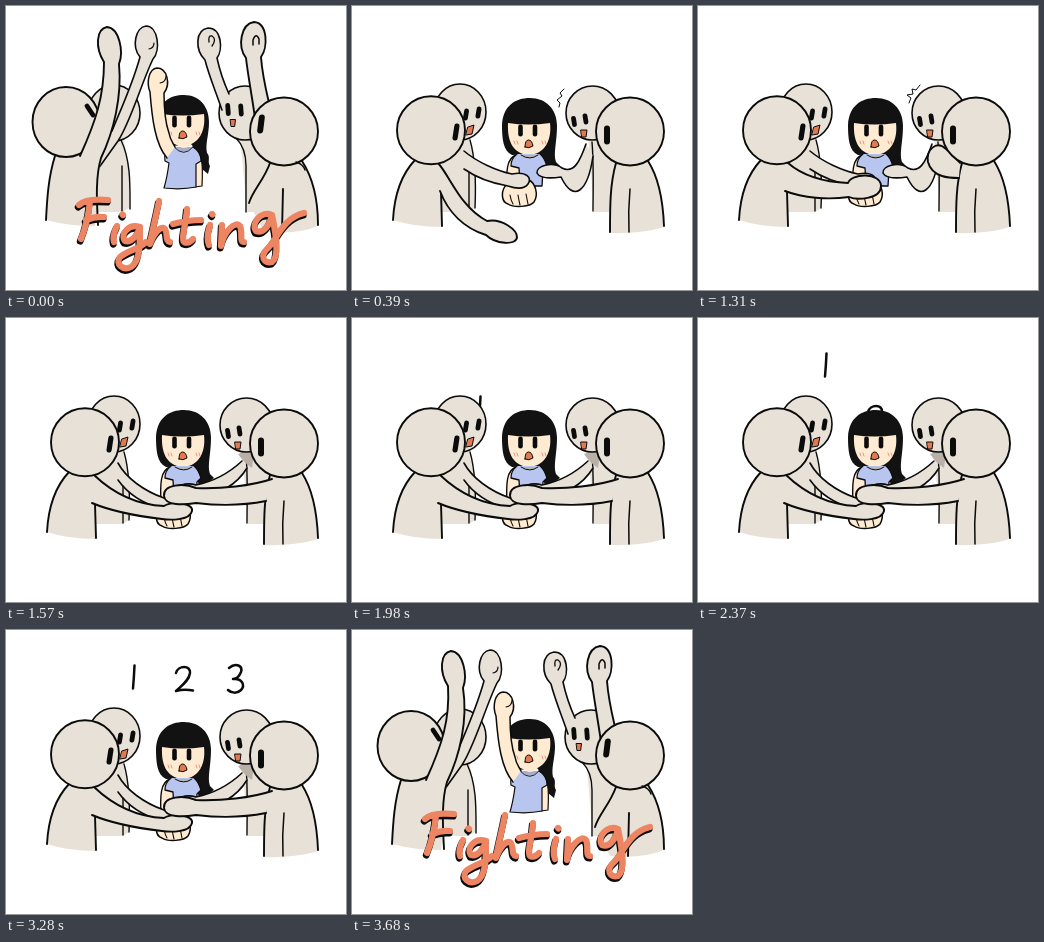
Animation of 340 by 284 pixels, one loop 3.81 s. Source, as an HTML page:

```html
<!DOCTYPE html>
<html lang="en">
<head>
<meta charset="utf-8">
<title>One, two, three, Fighting</title>
<style>
  html, body { margin: 0; width: 100%; height: 100%; overflow: hidden; background: #fff; }
  svg { display: block; width: 100%; height: 100%; }
</style>
</head>
<body>
<svg id="stage" viewBox="0 0 340 284" stroke-linecap="round" stroke-linejoin="round"></svg>
<script>
const LOOP = 3810;
const INK = '#0b0b0b', HAIR = '#121212', CLAY = '#e7e1d7', SKIN = '#ffebd2', BLUE = '#b8c5ee';
const ORANGE = '#ee8562', MOUTH = '#e2794f';
const stage = document.getElementById('stage');

const shape = (d, fill = CLAY, width = 1.9) =>
  `<path d="${d}" fill="${fill}" stroke="${INK}" stroke-width="${width}"/>`;
const flat = (d, fill = CLAY) => `<path d="${d}" fill="${fill}"/>`;
const line = (d, width = 1.9, color = INK) =>
  `<path d="${d}" fill="none" stroke="${color}" stroke-width="${width}"/>`;
const oval = (x, y, rx, ry, fill = CLAY, width = 1.9) =>
  `<ellipse cx="${x}" cy="${y}" rx="${rx}" ry="${ry}" fill="${fill}" stroke="${INK}" stroke-width="${width}"/>`;
const eye = (x, y, height, lean = 0, width = 4.8) => {
  const half = (height - width) / 2;
  return line(`M${x + lean} ${y - half}L${x - lean} ${y + half}`, width);
};
const group = (x, y, body) => `<g transform="translate(${x} ${y})">${body}</g>`;
const mouth = (x, y, w, h) =>
  shape(`M${x - w / 2} ${y - h / 2}L${x + w / 2} ${y - h / 2}L${x + w / 3} ${y + h / 2}L${x - w / 3} ${y + h / 2}Z`, MOUTH, 1);

// Key outlines of each reaching arm; a fractional pose blends two neighbours.
const ARMS = {
  backLeft: [
    'M112 145C116 150 118 154 122 157C130 155 134 162 132 168C129 173 124 173 120 171C117 169 114 167 112 164',
    'M112 145C125 156 145 165 160 168C175 165 180 172 176 178C172 184 162 182 156 180C138 177 125 172 112 163',
    'M112 145C120 160 138 173 158 180C170 178 178 182 176 188C172 194 162 193 156 191C138 186 122 176 112 162',
    'M112 145C125 156 145 165 160 168C175 165 180 172 176 178C172 184 162 182 156 180C138 177 125 172 112 163'],
  frontLeft: [
    'M86 157C98 170 108 201 135 215C150 212 165 224 165 231C165 240 143 238 134 229C112 222 96 206 88 185',
    'M90 157C105 170 125 176 150 177C153 167 183 166 183 180C183 194 158 194 151 191C130 194 105 192 87 185',
    'M88 157C110 178 135 187 158 188C166 183 188 185 186 193C184 203 163 202 156 201C130 198 105 193 86 185',
    'M88 157C110 174 135 179 152 179C158 175 183 173 183 181C183 193 162 193 153 191C130 194 105 193 87 185'],
  backRight: [
    'M234 138C228 155 222 168 210 162C200 155 184 160 185 167C188 173 202 172 209 171C222 198 236 185 241 150',
    'M236 143C222 156 205 164 190 167C180 164 168 168 170 174C172 181 180 180 190 180C212 177 230 168 241 150',
    'M236 143C222 155 205 160 190 160C180 158 168 161 170 168C172 175 180 174 190 174C212 173 230 166 241 150'],
  frontRight: [
    'M262 157C256 150 252 146 248 143C238 134 228 144 230 156C232 164 238 168 244 170C250 172 256 172 261 172',
    'M266 161C245 168 215 171 190 170C178 165 157 166 158 178C159 188 178 187 190 185C215 188 240 187 260 183',
    'M266 161C245 169 215 172 190 163C178 158 158 160 159 172C160 182 178 181 190 179C215 186 240 184 261 181']
};

function arm(name, pose, width) {
  if (pose < 0) return '';
  const keys = ARMS[name];
  const from = Math.min(Math.floor(pose), keys.length - 2);
  const target = keys[from + 1].match(/\d+/g);
  let i = 0;
  const d = keys[from].replace(/\d+/g, v => (+v + (target[i++] - v) * (pose - from)).toFixed(1));
  return shape(d, CLAY, width);
}

const SEATED_HAIR = 'M160 149C151 145 150 132 150 119C151 100 163 92 178 92C194 92 205 103 205 120C205 136 201 148 204 156L208 160L204 163L205 168C200 170 199 173 194 172L188 148Z';
const LONG_HAIR = 'M160 149C153 143 152 132 152 121C153 105 164 98 178 98C193 98 203 109 203 125C203 138 199 147 201 156C205 160 201 165 204 169L202 177L196 172L191 158L186 148Z';

const girlHead = hair =>
  flat(hair, HAIR) +
  flat('M156 117Q176 120 198 117C200 134 193 148 177 149C163 148 155 138 156 117Z', SKIN) +
  eye(168.5, 124.5, 12, 0, 4.6) + eye(183, 124.5, 12, 0, 4.6) +
  shape('M173 141Q173 134 176.5 134Q180 134 181 140Q177 143 173 141Z', MOUTH, 1) +
  line('M162 135l1 3m2-3l1 3M190 135l1 3m2-3l1 3', 1, '#f0937f');

const seatedGirl = () =>
  girlHead(SEATED_HAIR) +
  shape('M165 149C154 151 154 166 155 190L167 190L168 160', SKIN, 1.4) +
  shape('M165 148C161 151 159 156 159 160L167 162L168 180L190 180L191 164L195 160C193 154 191 150 188 148', BLUE, 1.3) +
  shape('M169 149Q178 155 186 149', '#b9b9a5', 1);

const fist = () =>
  shape('M156 177C148 184 149 196 156 198C162 202 178 201 182 196C187 188 183 177 177 174C169 170 160 172 156 177Z', SKIN, 1.5) +
  line('M158 189Q159 195 161 198M166 189Q167 195 168 199M174 188Q175 193 176 198', 1.1);

const JAGS = ['M212 83L208 87L210 90L205 94L208 97L207 101', 'M211 97L213 92L209 89L215 88L214 83L218 84L222 79'];

function gathered(s) {
  const fistDrop = Math.max(0, 10 * (1 - Math.abs(s.frontLeft - 2)));
  const backLeft = flat('M89 130L117 134C124 160 124 185 123 202L117 206L89 206Z') +
    line('M118 134C124 155 124 180 123 202M117 165V205', 1.4) +
    oval(108, 106, 26, 28, CLAY, 1.6) + eye(114, 108.5, 12, .6) + eye(126.5, 106.5, 12, .6) +
    shape('M116 121L122 119L120 128L114 129Z', MOUTH, 1);
  const backRight = flat('M236 130H270V206H242Z') + line('M240 136C242 160 241 185 241 205', 1.4) +
    (s.backRight > .9 ? flat('M232 136Q240 132 248 136L246 150Q238 145 232 136Z', '#b9b1a7') : '');
  const backRightHead = oval(240.5, 107, 26.5, 27, CLAY, 1.6) +
    eye(222, 115.5, 11, -.5) + eye(233.5, 113, 11, -.5) + mouth(232, 127.5, 6, 7);
  const frontLeft = flat('M63 153C45 172 42 195 41 214Q62 221 90 221L89 150Z') +
    line('M63 154C46 172 42 195 41 214M89 186L90 220');
  const frontRight = flat('M264 153C258 175 258 200 258 227Q290 228 312 221C311 190 304 165 295 153Z') +
    line('M264 157C258 178 258 200 258 226M296 155C307 172 311 195 312 220');
  return backLeft + seatedGirl() + group(0, fistDrop, fist()) +
    backRight + arm('backRight', s.backRight, 1.6) + backRightHead +
    arm('backLeft', s.backLeft, 1.6) +
    frontLeft + arm('frontLeft', s.frontLeft) + oval(79, 124.3, 34, 34) + eye(104, 126, 17, .9, 5.2) +
    frontRight + arm('frontRight', s.frontRight) + line('M278 183Q276 205 277 226', 1.5) +
    oval(278, 125.5, 34, 34) + eye(255, 129, 19, 0, 6) +
    (s.jag >= 0 ? line(JAGS[s.jag], 1) : '');
}

// Hand lettering, drawn as pen strokes.
const LETTERS = [
  'M84 195Q82 216 75 233M73 199Q80 192 102 194M80 214Q90 210 98 211',
  'M111 220Q106 230 108 236M116.5 208.5l.5 .5',
  'M134 221C122 217 114 229 119 235C126 237 132 228 134 221C134 238 134 256 125 261C117 265 109 258 114 251C122 244 134 243 140 236',
  'M153 195C150 211 146 225 144 238C148 227 155 219 159 223C162 228 159 235 164 236',
  'M181 203C180 218 175 232 178 236Q183 238 187 233M167 218Q182 214 195 214',
  'M204 219Q200 232 203 239M206 208l.5 .5',
  'M216 219L215 240C218 226 229 214 234 220C237 226 233 236 238 236',
  'M266 209C254 204 245 218 250 225C258 228 264 218 266 209C270 228 274 250 266 256C258 258 253 250 262 242C272 232 277 212 298 207'
].join('');

const lettering = y =>
  group(0, y, group(-.8, 2.2, line(LETTERS, 6.8)) + line(LETTERS, 6.2, ORANGE));

// lean pulls the left-hand figures outward, textY raises the lettering
function cheering(lean, textY) {
  const backLeft = flat('M88 130L117 133C124 155 124 185 123 202L116 206H88Z') +
    line('M115 134C125 155 124 180 124 203M116 160V205', 1.4) + oval(108, 107, 26, 28, CLAY, 1.6) +
    group(-lean, 0,
      shape('M106 125C114 105 126 80 134 51C125 40 130 21 140 20C152 20 155 44 147 53C135 78 125 115 112 135L92 163', CLAY, 1.6) +
      line('M143 43Q148 42 148 37', 1.2));
  const frontLeft = flat('M48 148C42 175 41 195 40 214Q62 220 89 220L95 150Z') +
    line('M49 150C42 172 41 195 40 214') + oval(60 - lean / 2, 116, 33.5, 35) +
    line('M81 100L87 109', 4.8) +
    shape(`M74 150C90 115 98 90 ${98 - lean} 56C${89 - lean} 42 ${90 - lean} 23 ${101 - lean} 21C${113 - lean} 22 ${118 - lean} 45 ${113 - lean} 58C116 90 108 125 95 152C89 172 91 198 92 219`);
  const girl = group(0, -9, girlHead(LONG_HAIR)) +
    shape('M188 143C197 148 197 160 196 180L189 181', SKIN, 1.2) +
    shape('M165 141C159 145 158 151 159 155L163 157Q161 172 158 182Q176 184 190 181L190 158L195 155C195 149 192 144 187 141', BLUE, 1.2) +
    shape('M168 141Q178 152 187 141', '#a9aec6', .8) + flat('M170 138Q178 146 186 138Z', SKIN) +
    shape('M161 152C149 138 146 112 144 86C140 76 143 63 151 62C161 62 165 78 158 87C158 100 159 116 163 127C164 134 167 137 169 141', SKIN, 1.5) +
    line('M154 77Q160 76 160 70', 1.1);
  const backRight = flat('M234 128H270V206H241Z') + line('M230 132Q240 142 240 160V206', 1.4) +
    oval(239, 107, 26, 27, CLAY, 1.6) +
    shape('M216 104C210 86 203 70 199 54C189 44 189 24 202 22C216 22 217 44 211 52C214 66 218 77 223 88', CLAY, 1.6) +
    line('M203 36Q202 29 206 30Q211 33 206 40', 1.3) +
    eye(222, 103.5, 13, -.3) + eye(235, 104, 13, -.3) + mouth(227, 117, 5, 7);
  const frontRight = flat('M264 153C257 175 246 185 243 197L258 226Q290 229 312 220C312 190 304 165 294 153Z') +
    line('M264 157C258 174 247 184 243 197M296 155C307 172 312 195 312 219M277 183L276 226') +
    shape('M249 112C246 90 242 70 240 52C231 40 235 18 248 16C262 17 262 42 255 51C256 66 259 80 263 97') +
    line('M247 39V34Q250 26 253 33V38', 1.5) +
    oval(278, 125.5, 34, 34) + eye(255, 118, 19, .8, 6) + line('M290 156Q297 158 299 164', 1.4);
  return backLeft + frontLeft + girl + backRight + frontRight + lettering(textY);
}

const COUNT_START = 1980, STEP = 130, BEAT = 3;
const LIFT = [0, 1, .5];
const DIGITS = [
  ['M128.5 35.5Q128 47 127 58.5', 43],
  ['M170 43C172 35 185 35 184 43C183 51 175 56 170 61Q178 59 187 60.5', 51],
  ['M223 38C230 32 237 36 235 42C233 47 230 49 227 49C237 48 239 56 235 60C231 64 225 63 222 60', 47]
];

const digits = ticks => DIGITS.map(([d, depth], n) => {
  const age = ticks - n * BEAT;
  return age < 0 ? '' : group(0, [depth, -13, -6][age] || 0, line(d, 2.5));
}).join('');

// start, back left, front left, back right, front right, startle mark
const GATHERING = [
  [130, 0, -1, -1, -1, -1],
  [260, .6, -1, 0, -1, -1],
  [390, 1, 0, 0, -1, 0],
  [520, 1, 0, 0, -1, 1],
  [650, 1, 0, 0, -1, 0],
  [780, 1, 0, 0, -1, 1],
  [1050, 1, .1, 0, -1, 0],
  [1180, 1, .6, 0, -1, 0],
  [1310, 1, 1, 0, 0, 1],
  [1440, 1.5, 1.5, .5, .6, -1],
  [1570, 2, 2, 1, 1, -1]
];

function scene(t) {
  if (t >= 3680) return cheering(2, -10);
  if (t < 130 || t >= 3550) return cheering(0, 0);
  const ticks = Math.min(Math.floor((t - COUNT_START) / STEP), 9);
  const lift = ticks < 0 ? 0 : LIFT[ticks % BEAT];
  const [, backLeft, frontLeft, backRight, frontRight, jag] = GATHERING.filter(row => row[0] <= t).pop();
  return digits(ticks) + gathered({
    backLeft: backLeft + lift, frontLeft: frontLeft + lift,
    backRight: backRight + lift, frontRight: frontRight + lift, jag
  });
}

const start = performance.now();
let shown = '';
function draw(now) {
  const markup = scene(Math.max(0, now - start) % LOOP);
  if (markup !== shown) stage.innerHTML = shown = markup;
  requestAnimationFrame(draw);
}
draw(start);
</script>
</body>
</html>
```
